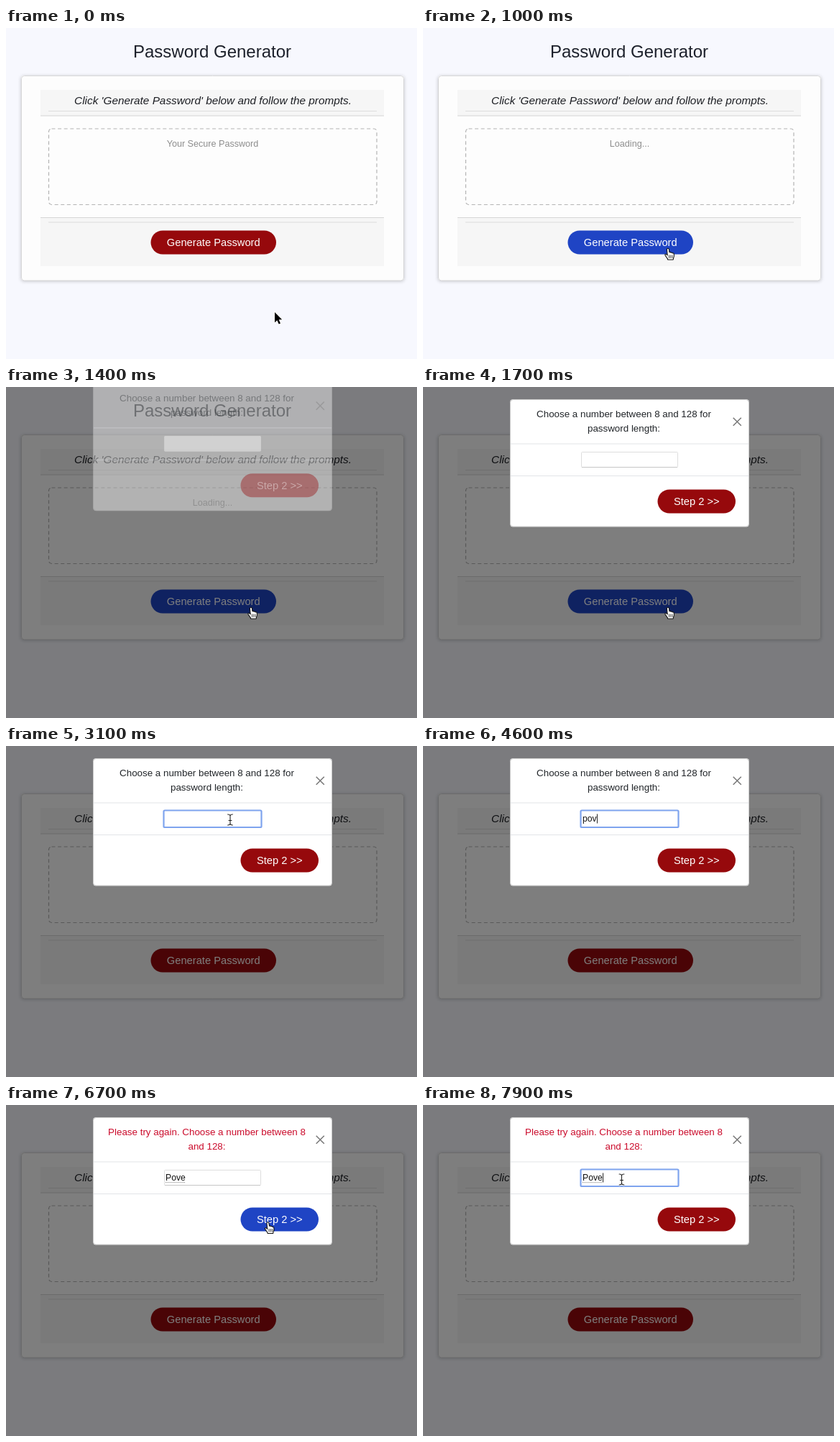
An HTML page with a canvas for the animation above (8000 ms loop, 572x460 px).

```html
<!DOCTYPE html>
<html lang="en">
<head>
<meta charset="utf-8">
<title>Password Generator</title>
<style>
html, body { margin: 0; width: 100%; height: 100%; overflow: hidden; background: #f7f8fe; }
canvas { display: block; width: 572px; height: 460px; }
</style>
</head>
<body>
<canvas id="stage" width="572" height="460"></canvas>
<script>
const ctx = document.getElementById('stage').getContext('2d');
const LOOP = 8000, STEP = 100;
const FONT = '"Liberation Sans", Arial, sans-serif';
const RED = [150, 9, 12], BLUE = [31, 68, 196];

const clamp = v => Math.max(0, Math.min(1, v));
const ramp = (t, start, length) => clamp((t - start) / length);
const smooth = p => p * p * (3 - 2 * p);
const lerp = (a, b, p) => a + (b - a) * p;
const between = (t, a, b) => t >= a && t < b;
const mix = (a, b, p) => `rgb(${a.map((v, i) => Math.round(lerp(v, b[i], p))).join()})`;

// CSS ease-out, cubic-bezier(0, 0, .58, 1)
function easeOut(x) {
  let lo = 0, hi = 1;
  for (let i = 0; i < 20; i++) {
    const s = (lo + hi) / 2;
    if (1.74 * s * s * (1 - s) + s * s * s < x) lo = s; else hi = s;
  }
  return lo * lo * (3 - 2 * lo);
}

function text(str, x, y, size, color, align = 'center', style = '') {
  ctx.font = `${style} ${size}px ${FONT}`;
  ctx.textAlign = align;
  ctx.fillStyle = color;
  ctx.fillText(str, x, y);
}

function rect(x, y, w, h, color) {
  ctx.fillStyle = color;
  ctx.fillRect(x, y, w, h);
}

function roundBox(x, y, w, h, r, fill, stroke, width = 1) {
  ctx.beginPath();
  ctx.roundRect(x, y, w, h, r);
  if (fill) { ctx.fillStyle = fill; ctx.fill(); }
  if (stroke) { ctx.strokeStyle = stroke; ctx.lineWidth = width; ctx.stroke(); }
}

function shadowBox(x, y, w, h, r, fill, shadow, blur) {
  ctx.save();
  ctx.shadowColor = shadow;
  ctx.shadowBlur = blur;
  ctx.shadowOffsetY = 1;
  roundBox(x, y, w, h, r, fill);
  ctx.restore();
}

function button(label, x, y, w, h, hover) {
  roundBox(x, y, w, h, h / 2, mix(RED, BLUE, hover));
  text(label, x + w / 2, y + 21.7, 14.7, '#fff');
}

function drawPage(t) {
  rect(0, 0, 572, 460, '#f7f8fe');
  text('Password Generator', 287, 41, 24, '#1d212b');
  shadowBox(21, 66, 533, 285, 4, '#fdfdfd', 'rgba(0,0,0,.22)', 5);
  roundBox(21.5, 66.5, 532, 284.5, 4, null, '#d8d8d9');

  rect(48, 86, 478, 36, '#f6f6f6');
  rect(48, 121.5, 478, 1, '#d6d6d6');
  rect(59, 115, 457, 1, '#dedede');
  text("Click 'Generate Password' below and follow the prompts.", 288, 105.5, 15.33, '#1d1f24', 'center', 'italic');

  ctx.setLineDash([5, 3.6]);
  roundBox(59.5, 140, 456.5, 105.5, 4, null, '#b4b4b4', 1.2);
  ctx.setLineDash([]);
  const loading = t >= 1000;
  text(loading ? 'Loading...' : 'Your Secure Password', 287.5, 164.6, 12.6, '#8d8d8d');

  rect(48, 264, 478, 67, '#f6f6f6');
  rect(48, 263, 478, 1, '#d6d6d6');
  rect(59, 269.5, 457, 1, '#dedede');
  button('Generate Password', 201.5, 281.5, 174.5, 33, ramp(t, 640, 150) - ramp(t, 1950, 150));
}

function drawField(t) {
  const focused = between(t, 2800, 6300) || t >= 7600;
  const corrected = t >= 6300;
  const typed = corrected ? 'Pove' : 'pove'.slice(0, Math.floor(clamp((t - 3900) / 800) * 4));
  if (focused) {
    roundBox(219.5, 89.5, 136, 23.5, 1.5, '#fff', '#7fa4ee', 2.2);
  } else {
    roundBox(220.5, 90.5, 134, 21, 1, '#fff', '#dedede');
    rect(221, 111, 133, 1, '#c6c6c6');
  }
  ctx.font = `12.2px ${FONT}`;
  const end = 222 + ctx.measureText(typed).width;
  const hint = between(t, 5000, 6300);
  if (hint) rect(221.5, 94, end - 221, 14, '#d5d5d5');
  text(typed, 222, 105.4, 12.2, '#111', 'left');
  if (corrected) {
    for (let x = 222; x < end; x += 2) rect(x, 107.2, 1, 1, '#777');
  }
  if (focused && t >= 3400) rect(end + .3, 94.5, 1, 13, '#222');
  if (hint) {
    roundBox(217, 109, 44.5, 15.5, 5, '#151517');
    text('Pove', 221.5, 119.8, 9, '#fff', 'left');
    text('×', 253, 120, 9.5, '#d0d0d0');
  }
}

function drawModal(t) {
  const alpha = ramp(t, 1340, 150);
  if (!alpha) return;
  ctx.save();
  ctx.globalAlpha = alpha;
  ctx.translate(0, -32 * (1 - easeOut(ramp(t, 1340, 300))));
  roundBox(121, 17, 333, 177.5, 4.5, '#fff');
  roundBox(121.5, 17.5, 332, 176.5, 4.5, null, 'rgba(0,0,0,.2)');
  rect(122, 78.5, 331, 1, '#e2e4e8');
  rect(122, 123, 331, 1, '#e2e4e8');

  const failed = t >= 6300;
  const lines = failed
    ? ['Please try again. Choose a number between 8', 'and 128:']
    : ['Choose a number between 8 and 128 for', 'password length:'];
  lines.forEach((s, i) => text(s, 279.5, 42.3 + i * 20, 13.37, failed ? '#cb0c2c' : '#212529'));

  ctx.beginPath();
  ctx.moveTo(431.7, 42.7); ctx.lineTo(442.8, 53.8);
  ctx.moveTo(442.8, 42.7); ctx.lineTo(431.7, 53.8);
  ctx.strokeStyle = '#777';
  ctx.lineWidth = 1.5;
  ctx.stroke();

  drawField(t);
  button('Step 2 >>', 326.5, 142.5, 108.5, 33, ramp(t, 5950, 150) - ramp(t, 7300, 150));
  ctx.restore();
}

const ARROW = new Path2D('M0 0V14.2L3.3 11.2L5.7 16.5L8 15.5L5.7 10.3H10.2Z');
const HAND = new Path2D('M-1.6 1.2Q-1.4-.4 0-.3Q1.2-.2 1.4 1.2L2 5.2Q3.4 4.4 4.1 5.7Q5.6 5 6.2 6.4Q8 6 8.3 7.6Q8.9 10.6 7.6 13.2L7.2 15.5H-.2Q-.8 13.3-2.6 11.3Q-4.6 8.8-4 8Q-3-.2 7-.2Z'.replace('Q-3-.2 7-.2Z', 'Q-2.8 7.2-.8 9.4Z'));
const BEAM = new Path2D('M-3.4-7.5Q-.6-7.5 0-5.8Q.6-7.5 3.4-7.5M0-5.8V5.8M-3.4 7.5Q-.6 7.5 0 5.8Q.6 7.5 3.4 7.5M-2 1H2');

function drawCursor(kind, x, y) {
  ctx.save();
  ctx.translate(x, y);
  ctx.lineJoin = ctx.lineCap = 'round';
  const stroke = (path, color, width) => {
    ctx.strokeStyle = color;
    ctx.lineWidth = width;
    ctx.stroke(path);
  };
  if (kind === 'beam') {
    stroke(BEAM, 'rgba(255,255,255,.9)', 2.8);
    stroke(BEAM, '#222', 1.1);
  } else if (kind === 'hand') {
    ctx.fillStyle = '#fff';
    ctx.fill(HAND);
    stroke(HAND, '#111', 1.1);
    ctx.beginPath();
    for (const fx of [1.5, 3.7, 5.9]) {
      ctx.moveTo(fx, 9.4);
      ctx.lineTo(fx, 13);
    }
    ctx.strokeStyle = '#111';
    ctx.lineWidth = .8;
    ctx.stroke();
  } else {
    stroke(ARROW, '#fff', 2.2);
    ctx.fillStyle = '#000';
    ctx.fill(ARROW);
  }
  ctx.restore();
}

// start, duration, from, to, sideways bow
const MOVES = [
  [350, 500, [374, 395], [341, 306.5], 0],
  [1850, 550, [341, 306.5], [312, 102.5], 34],
  [5250, 550, [312, 102.5], [364.5, 163], 8],
  [7150, 700, [364.5, 163], [276.5, 103.5], 0]
];

function cursorAt(t) {
  const [start, length, a, b, bow] = MOVES.filter(m => t >= m[0]).pop() || MOVES[0];
  const p = smooth(ramp(t, start, length));
  return [lerp(a[0], b[0], p) + bow * 4 * p * (1 - p), lerp(a[1], b[1], p)];
}

function cursorKind(t, y) {
  if (between(t, 640, 1950) || between(t, 6000, 7300)) return 'hand';
  if (t >= 4100 || (t > 2000 && y < 112)) return 'beam';
  return 'arrow';
}

function draw(t) {
  drawPage(t);
  rect(0, 0, 572, 460, `rgba(0,0,0,${.5 * ramp(t, 1155, 150)})`);
  drawModal(t);
  const [x, y] = cursorAt(t);
  if (!between(t, 4100, 5000)) drawCursor(cursorKind(t, y), x, y);
}

let origin;
function tick(now) {
  origin ??= now;
  const t = (now - origin) % LOOP;
  draw(Math.floor(t / STEP) * STEP);
  requestAnimationFrame(tick);
}
draw(0);
requestAnimationFrame(tick);
</script>
</body>
</html>
```
